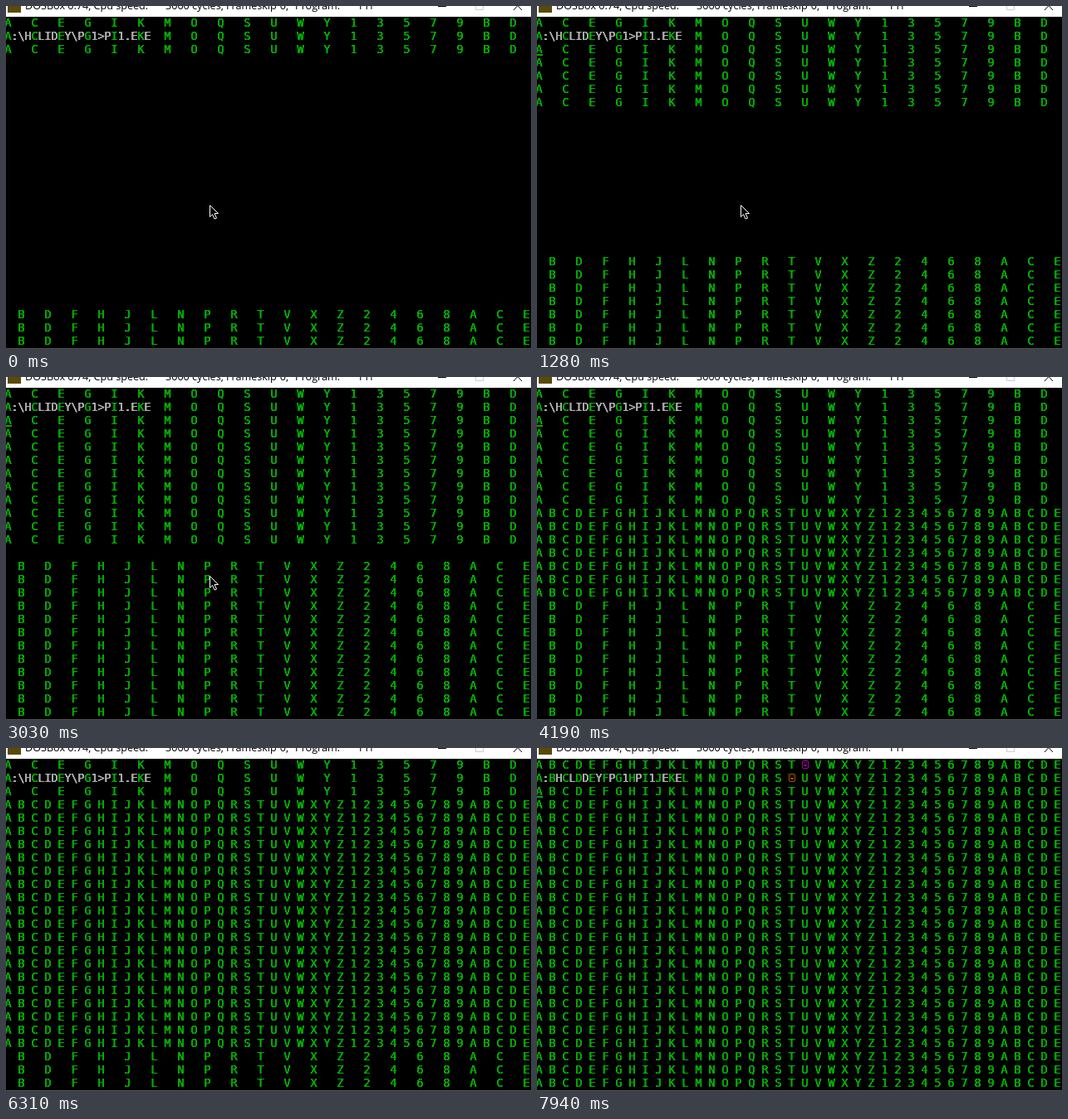
Animation, 632 px wide and 414 px high, one loop 8000 ms. Source, as an HTML page with a canvas:

```html
<!DOCTYPE html>
<html lang="en">
<head>
<meta charset="utf-8">
<title>DOSBox</title>
<style>
  html, body { margin: 0; width: 100%; height: 100%; overflow: hidden; background: #000; }
  #screen, #chrome { position: absolute; left: 0; top: 0; width: 632px; height: 414px; }
  #screen { filter: url(#crisp); }
  #chrome text { font: 12.6px "Open Sans", sans-serif; fill: #000; }
</style>
</head>
<body>
<canvas id="screen" width="632" height="414"></canvas>
<svg id="chrome" viewBox="0 0 632 414">
  <filter id="crisp" x="0" y="0" width="1" height="1" color-interpolation-filters="sRGB">
    <feComponentTransfer><feFuncA type="linear" slope="2.2" intercept="-.6"/></feComponentTransfer>
  </filter>
  <rect width="632" height="13" fill="#fff"/>
  <rect y="413" width="632" height="1" fill="#555"/>
  <rect x="2" width="16" height="8" fill="#5a4a08"/>
  <text x="23" y="4">DOSBox 0.74, Cpu speed:</text>
  <text x="192" y="4">3000 cycles, Frameskip</text>
  <text x="335" y="4" text-anchor="middle">0,</text>
  <text x="402" y="4" text-anchor="end">Program:</text>
  <text x="425" y="4">PI1</text>
  <path d="M520 .5h10" stroke="#000"/>
  <path d="M565.5 0v4.5h9V0" fill="none" stroke="#ccc"/>
  <path d="M615.5 0l-4.5 5M616.5 0l4.5 5" stroke="#000"/>
  <path id="mouse" d="M245.5 240.5v14l3-3 2.5 5.5 2.5-1-2.5-5.500h4.500z" fill="#000" stroke="#fff"/>
</svg>
<script>
const LOOP = 8000, LAST = 24, MOUSE_GONE = 3490;
const GREEN = '#00aa00', GREY = '#aaaaaa', MAGENTA = '#aa00aa', BROWN = '#aa5500';
const LETTERS = 'ABCDEFGHIJKLMNOPQRSTUVWXYZ123456789ABCDE';
const PROMPT = 'A:\\HCLIDEY\\PG1>PI1.EKE';

// Evenly spaced steps: r = next row, c = cursor blink, b = both, f = blink and face
const RUNS = [
  [120, 850, 'rccrcb'], [1130, 1280, 'rc'], [1580, 1860, 'bcb'],
  [2140, 2290, 'bc'], [2590, 3030, 'bcrc'], [3180, 3180, 'b'],
  [3490, 4190, 'crcbcb'], [4470, 5160, 'crcbcc'], [5310, 5310, 'b'],
  [5610, 6310, 'bcrccb'], [6590, 7320, 'bccrcb'], [7630, 7940, 'ff']
];
const steps = RUNS.flatMap(([from, to, codes]) => [...codes].map((code, i) => ({
  at: from + (to - from) * i / Math.max(1, codes.length - 1), code
})));

const mouse = document.getElementById('mouse');
const ctx = document.getElementById('screen').getContext('2d');
const cellX = col => 8 * col - 1;
const cellY = row => 13 + 16 * row;

function glyph(ch, col, row) {
  // The doubled pass thickens upright strokes only
  for (const dx of [3.1, 3.9]) ctx.fillText(ch, cellX(col) + dx, cellY(row) + 12);
}

function face(col, row, color) {
  ctx.clearRect(cellX(col), cellY(row), 8, 16);
  ctx.fillStyle = color;
  const dot = (x, y, w, h) => ctx.fillRect(cellX(col) + x, cellY(row) + 2 + y, w, h);
  for (const y of [0, 9]) dot(1, y, 6, 1);
  for (const x of [0, 7]) dot(x, 1, 1, 8);
  for (const x of [2, 5]) dot(x, 2, 1, 1);
  dot(2, 5, 4, 1);
  dot(3, 6, 2, 1);
}

function draw({ reach, cursor, faces }) {
  ctx.clearRect(0, 0, 632, 414);
  ctx.font = '13.7px "DejaVu Sans Mono", monospace';
  ctx.textAlign = 'center';
  const covered = (i, row) => i % 2 ? row >= LAST - reach : row <= reach;

  ctx.fillStyle = GREY;
  [...PROMPT].forEach((ch, col) => {
    if (col % 2 || !covered(col / 2, 1)) glyph(ch, col, 1);
  });

  ctx.fillStyle = GREEN;
  for (let row = 0; row <= LAST; row++)
    [...LETTERS].forEach((ch, i) => { if (covered(i, row)) glyph(ch, 2 * i, row); });
  if (cursor) ctx.fillRect(cellX(0), cellY(2) + 13, 8, 2);

  if (faces > 0) face(40, 0, MAGENTA);
  if (faces > 1) face(38, 1, BROWN);
}

function stateAt(t) {
  const state = { reach: 2, cursor: false, faces: 0 };
  for (const { at, code } of steps) {
    if (at > t) break;
    if ('rb'.includes(code)) state.reach++;
    if (code !== 'r') state.cursor = !state.cursor;
    if (code === 'f') state.faces++;
  }
  return state;
}

let shown = '';
const start = performance.now();
function tick() {
  const t = (performance.now() - start) % LOOP;
  const state = stateAt(t);
  const key = Object.values(state).join();
  if (key !== shown) {
    shown = key;
    draw(state);
  }
  mouse.style.visibility = t < MOUSE_GONE ? 'visible' : 'hidden';
  requestAnimationFrame(tick);
}
tick();
</script>
</body>
</html>
```
